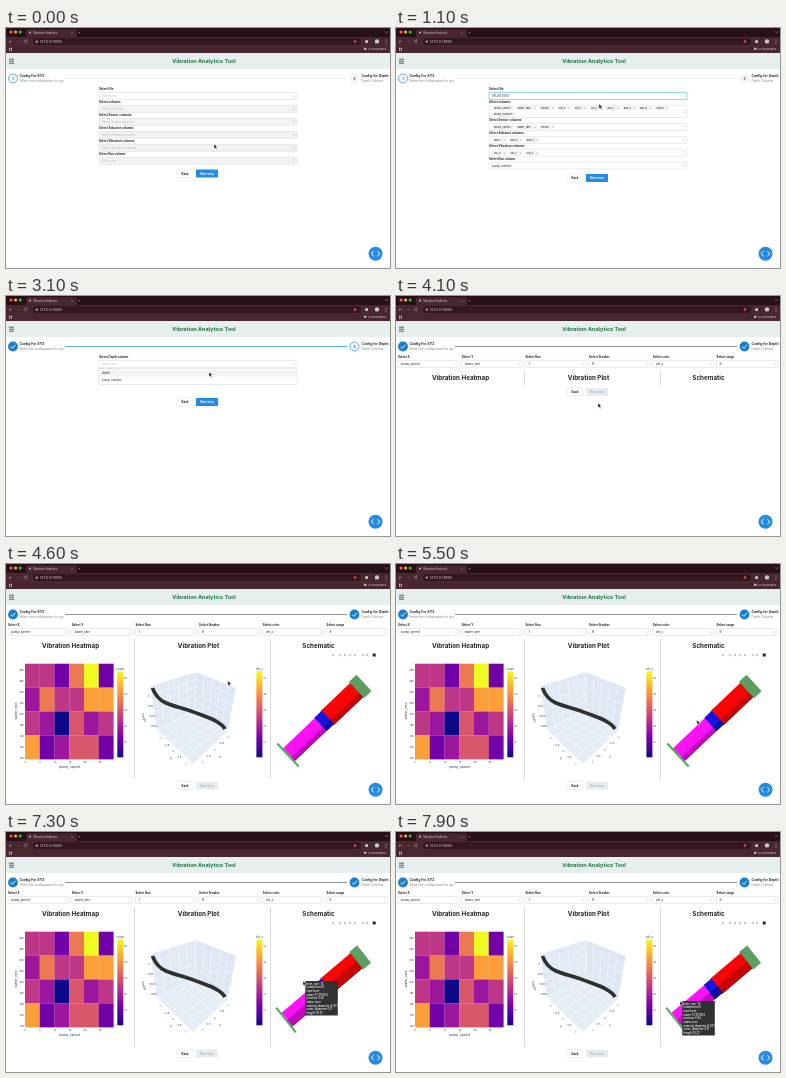
Recreate the animation shown at these times as an HTML page. Size 384 by 240 pixels, loop 8000 ms.

```html
<!DOCTYPE html>
<html lang="en">
<head>
<meta charset="utf-8">
<title>Vibration Analytics</title>
<style>
html, body { margin: 0; width: 100%; height: 100%; overflow: hidden; background: #fff; }
svg { display: block; width: 100vw; height: 100vh; font-family: Inter, sans-serif; }
</style>
</head>
<body>
<svg id="stage" viewBox="0 0 384 240"></svg>
<script>
const BLUE = '#228be6', DARK = '#222', GREY = '#868e96', LIGHT = '#f1f3f5', EDGE = '#ced4da', INK = '#2a3f5f';
const text = (x, y, size, str, fill = DARK, more = '') =>
  `<text x="${x}" y="${y}" font-size="${size}" fill="${fill}" ${more}>${str}</text>`;
const bold = (x, y, size, str, fill = DARK, more = '') => text(x, y, size, str, fill, 'font-weight="700" ' + more);
const MID = 'text-anchor="middle"';
const rect = (x, y, w, h, fill, more = '') =>
  `<rect x="${x}" y="${y}" width="${w}" height="${h}" fill="${fill}" ${more}/>`;
const circle = (x, y, r, fill, more = '') => `<circle cx="${x}" cy="${y}" r="${r}" fill="${fill}" ${more}/>`;
const path = (d, stroke, width = .5, fill = 'none') =>
  `<path d="${d}" stroke="${stroke}" stroke-width="${width}" fill="${fill}"/>`;
const group = (id, body) => `<g id="${id}">${body}</g>`;

function browser() {
  return rect(0, 0, 384, 9, '#281017') + rect(0, 9, 384, 16, '#482730') +
    ['#ff5f57', '#febc2e', '#28c840'].map((c, i) => circle(5 + i * 4.6, 4, 1.5, c)).join('') +
    rect(20, 1.2, 51, 8, '#482730', 'rx="2"') + circle(24, 4.6, 1.1, '#aaa') +
    text(27, 5.5, 2.75, 'Vibration Analytics', '#ddd') + text(65, 5.6, 3, '×', '#ddd') + text(72, 5.9, 4, '+', '#ccc') +
    path('M379 3.4l1.5 1.5 1.5-1.5', '#bbb') +
    text(2.5, 14.9, 4, '←', '#ddd') + text(10.5, 14.9, 4, '→', '#866') + text(18, 15, 4.2, '↻', '#ddd') +
    rect(27, 10.2, 328, 6.8, '#32171e', 'rx="3.4"') + circle(30.8, 13.6, 1.2, '#aaa') +
    text(34, 14.8, 3.35, '127.0.0.1:8050', '#e4dcdf') +
    circle(349, 13.6, 1.3, '#e34850') + rect(359.3, 12.2, 2.6, 2.8, '#ccc') + circle(371, 13.4, 2.2, '#c3cad2') +
    path('M380 11.6v.8m0 1v.8m0 1v.8', '#ddd', .7) +
    [0, 1, 2, 3].map(i => rect(3 + i % 2 * 1.8, 19.8 + (i >> 1) * 1.8, 1.2, 1.2, '#ccc')).join('') +
    rect(358, 19.8, 2.5, 2, '#bbb') + text(362, 22, 2.7, 'All Bookmarks', '#ccc');
}

function header() {
  return rect(0, 25, 384, 16, '#e6eeee') + path('M3 31.2h5m-5 2h5m-5 2h5', '#222', .7) +
    bold(198, 35.3, 5.44, 'Vibration Analytics Tool', '#1d7442', MID) +
    bold(13.4, 49.3, 3.35, 'Config For XYZ') + text(13.4, 53.6, 3, 'Select the configuration for xyz', '#777f87') +
    bold(355.5, 49.3, 3.35, 'Config for Depth') + text(355.5, 53.6, 3, 'Depth Columns', '#777f87');
}

const done = x => circle(x, 50.5, 4.9, '#1c7cd0') + path(`M${x - 2.2} 50.6l1.6 1.7 3-3.5`, '#fff', .9);
const pending = (x, n, edge, fill) =>
  circle(x, 50.5, 4.5, fill, `stroke="${edge}" stroke-width=".7"`) + bold(x, 51.7, 3.3, n, '#495057', MID);
const rail = c => path('M59 50.5H341', c, .7);

const chevrons = (x, y) => path(`M${x - .9} ${y - .6}l.9-.9.9.9m-1.8 1.2l.9.9.9-.9`, GREY, .35);
const box = (x, y, w, h, fill = '#fff', edge = EDGE) =>
  rect(x, y, w, h, fill, `stroke="${edge}" stroke-width=".5" rx=".7"`) + chevrons(x + w - 3, y + h / 2);
const label = (y, s) => bold(93, y, 2.9, 'Select ' + s);
const field = (y, title, value, state) =>
  label(y, title) + box(93, y + 2.2, 198, 7, state === 'off' ? LIGHT : '#fff', state === 'focus' ? '#15aabf' : EDGE) +
  text(96, y + 6.8, 2.9, value, state === 'off' || state === 'hint' ? '#b3b9bf' : DARK);

function chips(x, y, names) {
  return names.map(name => {
    const w = name.length * 1.42 + 8;
    const s = rect(x, y - 2.3, w, 4.4, LIGHT, 'rx="2.2"') + text(x + 2, y + .8, 2.65, name) +
      text(x + w - 3.6, y + .9, 2.8, '×', GREY);
    x += w + 1.2;
    return s;
  }).join('');
}

const buttons = (y, fill = BLUE, ink = '#fff') =>
  rect(171, y - 4, 16, 8, '#fff', `stroke="${EDGE}" stroke-width=".4" rx=".8"`) + bold(179, y + 1.1, 2.9, 'Back', DARK, MID) +
  rect(190, y - 4, 22, 8, fill, 'rx=".8"') + bold(201, y + 1.1, 2.9, 'Next step', ink, MID);
const options = (y, list) =>
  rect(93, y, 198, list.length * 7 + 2, '#fff', `stroke="${EDGE}" stroke-width=".5" rx=".7"`) +
  list.map((s, i) => (i ? '' : rect(94, y + 1, 196, 7, LIGHT)) + text(96, y + 5.5 + i * 7, 2.9, s)).join('');

const SENSORS = ['pump_speed', 'water_rate', 'torque'], ADV = ['adv_1', 'adv_2', 'adv_3'], VIB = ['vib_x', 'vib_y', 'vib_z'];

function emptyForm() {
  const rows = [['columns', 'Select columns'], ['Sensor columns', 'Select Sensor columns'],
    ['Advance columns', 'Select Advance columns'], ['Vibration columns', 'Select Vibration columns'], ['Run column', 'Select one']];
  return field(62.2, 'File', 'Select one', 'hint') +
    rows.map(([a, b], i) => field(75.2 + i * 12.95, a, b, 'off')).join('') + buttons(145.5);
}

function filledForm() {
  const multi = (y, title, names) => field(y, title, '') + chips(96, y + 5.7, names);
  return field(62.2, 'File', 'ATLAS_1000', 'focus') + label(75.2, 'columns') + box(93, 77.2, 198, 12.4) +
    chips(96, 80, [...SENSORS, ...VIB, ...ADV, 'depth']) + chips(96, 85.9, ['pump_number']) +
    multi(93.3, 'Sensor columns', SENSORS) + multi(106.2, 'Advance columns', ADV) +
    multi(119, 'Vibration columns', VIB) + field(131.8, 'Run column', 'pump_number') + buttons(150);
}

function filters() {
  const items = [['X', 'pump_speed'], ['Y', 'water_rate'], ['Run', '1'], ['Breaker', '8'], ['color', 'vib_x'], ['range', '9']];
  return items.map(([name, value], i) => {
    const x = 2 + i * 63.7;
    return bold(x, 62.3, 2.9, 'Select ' + name) + box(x, 64.4, 61.3, 7) + text(x + 3, 69, 3.1, value);
  }).join('') +
    [[64.5, 'Vibration Heatmap'], [192.5, 'Vibration Plot'], [312.5, 'Schematic']]
      .map(([x, s]) => bold(x, 83.6, 6.25, s, DARK, MID)).join('');
}
const dividers = y => path(`M128.5 75V${y}M264.5 75V${y}`, '#adb5bd', .5);

const PLASMA = ['#0d0887', '#46039f', '#7201a8', '#9c179e', '#bd3786', '#d8576b', '#ed7953', '#fb9f3a', '#fdca26', '#f0f921'];
const colorBar = (x, title) => rect(x, 107.3, 6, 86, 'url(#plasma)') + text(x + 3, 106.2, 3, title, INK, MID) +
  [1, 2, 3, 4, 5].map(i => text(x + 6.8, 195 - i * 16, 2.5, i * 10, INK)).join('');

function heatmap() {
  const levels = ['442692', '364477', '430534', '723552'];
  const cells = levels.map((row, r) => [...row].map((v, c) =>
    rect(19 + c * 14.75, 99.7 + r * 23.9, 14.85, 24, PLASMA[v])).join('')).join('');
  return cells + colorBar(111.3, 'count') +
    [...Array(9).keys()].map(i => text(18, 195 - i * 11, 2.6, 120 + i * 20, INK, 'text-anchor="end"')).join('') +
    [0, 1, 2, 3, 4, 5].map(i => text(19 + i * 15, 198.8, 2.6, i * 5, INK, MID)).join('') +
    text(63.5, 204, 3.4, 'pump_speed', INK, MID) +
    text(0, 0, 3.4, 'water_rate', INK, MID + ' transform="translate(11 147) rotate(-90)"');
}

function plot3d() {
  const [a, b, c, d, e, f, m] = [[144, 122], [190, 108], [230, 124], [222, 167], [187, 200], [151, 166], [190, 145]];
  const mix = (p, q, k) => p.map((v, i) => (v + (q[i] - v) * k).toFixed(1));
  const face = (p, q, r, s, fill) => {
    let lines = '';
    for (let k = .2; k < .95; k += .2)
      lines += `M${mix(p, q, k)}L${mix(s, r, k)}M${mix(p, s, k)}L${mix(q, r, k)}`;
    return path(`M${p}L${q}L${r}L${s}Z`, '#fff', .4, fill) + path(lines, '#fff', .4);
  };
  const ticks = (p, q, list) => list.map((s, i) => {
    const [x, y] = mix(p, q, (i + .5) / list.length);
    return text(x, y, 2.7, s, INK, MID);
  }).join('');
  const curve = 'M146.5 124C149 131 153 136 160 139S180 145 193 150S215 158 219 165';
  return face(a, b, m, f, '#e1e9f4') + face(b, c, d, m, '#dde6f2') + face(f, m, d, e, '#e7edf7') + path(curve, '#303030', 3.7) +
    ticks([142, 128], [149, 168], ['0', '500', '1000', '1500']) +
    ticks([151, 172], [183, 204], ['−1', '−0.5', '0', '0.5', '1']) +
    ticks([193, 202], [225, 171], ['1', '0.5', '0', '−0.5', '−1']) +
    text(0, 0, 3, 'Height', INK, MID + ' transform="translate(137 154) rotate(75)"') +
    text(164, 195, 3, 'y', INK) + text(213, 194, 3, 'x', INK) + colorBar(250.4, 'vib_x');
}

const toolbar = () => [327, 334, 339, 344, 349, 357, 361]
  .map((x, i) => i % 2 ? circle(x, 91, 1, 'none', 'stroke="#999" stroke-width=".5"') : path(`M${x - 1} 91h2m-1-1.2v2.4`, '#999', .6)).join('') +
  rect(366.7, 89.5, 3, 3, '#3c1d33');

// Drill string seen at an angle; k turns it from the first view to the second.
function drill(k) {
  const lerp = (p, q) => p + (q - p) * k;
  const ax = lerp(282, 280), ay = lerp(191, 188), bx = 355.5, by = lerp(121, 124);
  const px = lerp(6.3, 5.8), py = lerp(6.8, 7.3);
  const at = (u, v) => [(ax + (bx - ax) * u + px * v).toFixed(2), (ay + (by - ay) * u + py * v).toFixed(2)];
  const part = (u, w, v0, v1, fill, edge = 'none') =>
    path(`M${at(u, v0)}L${at(w, v0)}L${at(w, v1)}L${at(u, v1)}Z`, edge, .4, fill);
  const shade = lerp(.45, .1);
  const mesh = [.1, .3, .5, .7, .9].map(v => `M${at(.02, v)}L${at(.44, v)}`).join('');
  return part(-.01, .01, -1.7, 1.7, '#43b54f') +
    part(.01, .45, -.9, .95, '#fb12f6') + part(.01, .45, shade, .95, '#c808c6') +
    `<path d="${mesh}" stroke="#7d007f" stroke-width=".4" stroke-dasharray=".7 1.2" fill="none"/>` +
    part(.53, .96, -1, 1.05, '#f80606') + part(.53, .96, shade, 1.05, '#c80404') +
    part(.44, .54, -.95, 1, '#1515e0') + part(.44, .54, shade, 1, '#0c0ca4') +
    path(`M${at(.53, 1.05)}L${at(.95, 1.05)}M${at(.01, .95)}L${at(.45, .95)}`, '#300', .5) +
    part(.93, 1.03, -1.15, 1.2, '#5d9e63', '#3c7a45');
}

function tooltip() {
  const lines = ['hole_size: 12', 'component:5', 'type:bore', 'name:TC171304', 'position:0.25', 'status:true',
    'internal_diameter:0.077', 'outer_diameter:0.11', 'length:10.37'];
  return rect(0, 0, 32.5, 34.5, '#333034') +
    lines.map((s, i) => text(1.2, 3.8 + i * 3.65, 2.8, s, '#fff', 'font-weight="500"')).join('');
}

const stage = document.getElementById('stage');
stage.innerHTML =
  `<defs><linearGradient id="plasma" x1="0" y1="1" x2="0" y2="0">${PLASMA.map((c, i) => `<stop offset="${i / 9}" stop-color="${c}"/>`).join('')}</linearGradient></defs>` +
  browser() + header() +
  group('stepOne', rail('#dee2e6') + pending(7, 1, BLUE, '#f1f7fd') + pending(348.5, 2, '#e9ecef', LIGHT)) +
  group('stepTwo', rail(BLUE) + done(7) + pending(348.5, 2, BLUE, '#f1f7fd')) +
  group('stepsDone', rail('#5f676e') + done(7) + done(348.5)) +
  group('empty', emptyForm()) +
  group('fileList', options(72.5, ['ATLAS_1000'])) +
  group('filled', filledForm()) +
  group('hover', buttons(150, '#1c70bd')) +
  group('depthForm', field(62.2, 'Depth column', 'Select one', 'hint') + field(75.2, 'Run column', 'pump_number') + buttons(106)) +
  group('depthList', options(72.5, ['depth', 'pump_number'])) +
  group('depthPicked', field(62.2, 'Depth column', 'depth', 'focus')) +
  group('results', filters()) +
  group('waiting', dividers(89) + buttons(96, '#e9ecef', '#adb5bd')) +
  group('charts', dividers(215) + heatmap() + plot3d() + toolbar() + group('drill', '') + buttons(221.5, '#e9ecef', '#adb5bd')) +
  group('tip', tooltip()) +
  circle(369.5, 225.7, 7, BLUE) + path('M367.7 223.2l-2.6 2.5 2.6 2.5m3.6-5l2.6 2.5-2.6 2.5', '#fff', 1) +
  group('cursor', path('M0 0v4.6l1.1-1 .8 1.8.9-.4-.8-1.7h1.5z', '#fff', .4, '#111'));

const SPANS = {
  stepOne: [0, 2200], stepTwo: [2200, 4000], stepsDone: [4000, 8000],
  empty: [0, 1100], fileList: [600, 1100], filled: [1100, 2200], hover: [1900, 2200],
  depthForm: [2200, 4000], depthList: [2800, 3200], depthPicked: [3200, 4000],
  results: [4000, 8000], waiting: [4000, 4500], charts: [4500, 8000], tip: [6700, 8000],
};
const MOVES = [[0, 208, 116], [500, 203, 68], [700, 203, 68], [1000, 203, 76], [1200, 203, 76], [1900, 202, 150], [2200, 202, 150],
  [2700, 203, 68], [2900, 203, 68], [3100, 203, 76], [3200, 203, 76], [3800, 202, 107], [4400, 202, 107],
  [5100, 301, 156], [5400, 301, 156], [6100, 298, 156], [6700, 298, 156], [7100, 297, 149], [7400, 297, 149], [7700, 284, 169], [8000, 284, 169]];
const el = id => document.getElementById(id);
const ease = k => k * k * (3 - 2 * k);
const clamp = k => Math.max(0, Math.min(1, k));

function cursorAt(t) {
  const i = MOVES.findIndex(m => m[0] > t);
  const [t0, x0, y0] = MOVES[i - 1], [t1, x1, y1] = MOVES[i];
  const k = ease((t - t0) / (t1 - t0));
  return [x0 + (x1 - x0) * k, y0 + (y1 - y0) * k];
}

function draw(now) {
  const t = now % 8000;
  for (const id in SPANS) el(id).style.display = t >= SPANS[id][0] && t < SPANS[id][1] ? '' : 'none';
  const [x, y] = cursorAt(t);
  el('cursor').setAttribute('transform', `translate(${x} ${y})`);
  el('tip').setAttribute('transform', `translate(${x + 2.3} ${y})`);
  el('drill').innerHTML = drill(ease(clamp((t - 5500) / 600)));
  requestAnimationFrame(draw);
}
requestAnimationFrame(draw);
</script>
</body>
</html>
```
